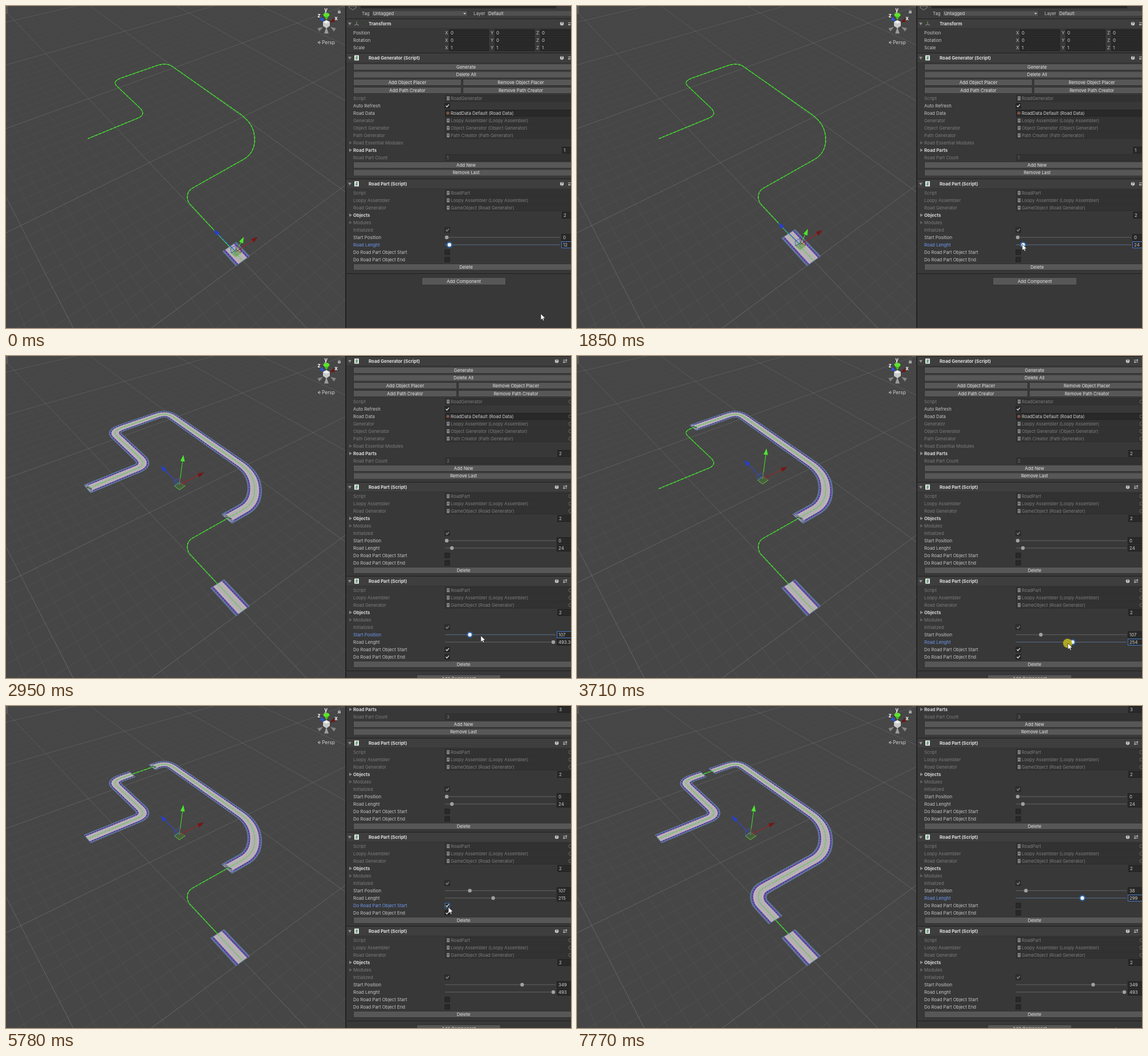
Recreate the animation shown at these times as an HTML page with a canvas. Size 991 px wide and 565 px high, loop 7.8 s.

```html
<!DOCTYPE html>
<html lang="en">
<head>
<meta charset="utf-8">
<title>Road editor</title>
<style>
html, body { margin: 0; width: 100%; height: 100%; overflow: hidden; background: #383838; }
canvas { display: block; }
</style>
</head>
<body>
<canvas id="stage" width="991" height="565"></canvas>
<script>
const ctx = document.getElementById('stage').getContext('2d');
const LOOP = 7800, MAX = 493.3;
const FONT = 'Inter, "Open Sans", sans-serif';

// ---------- timeline ----------
function tween(keys, t) {
  const i = keys.findIndex(k => k[0] > t);
  if (i < 0) return keys[keys.length - 1].slice(1);
  if (i === 0) return keys[0].slice(1);
  const a = keys[i - 1], b = keys[i], f = (t - a[0]) / (b[0] - a[0]);
  return a.slice(1).map((v, j) => v + (b[j + 1] - v) * f);
}
const last = (steps, t) => steps.filter(s => s[0] <= t).pop();

const CURSOR = [
  [0, 938, 540], [50, 938, 540], [260, 777, 419], [670, 953, 427], [920, 968, 429], [1050, 968, 429],
  [1680, 781, 418], [1860, 781, 418], [2070, 807, 281], [2130, 807, 281], [2320, 773, 489],
  [2450, 799, 488], [2850, 813, 489], [2920, 813, 489], [3150, 960, 502], [3200, 958, 502],
  [3710, 861, 504], [3950, 853, 504], [4030, 853, 504], [4270, 802, 199], [4340, 802, 199],
  [4640, 773, 489], [5140, 905, 490], [5180, 905, 490], [5390, 775, 516], [5450, 775, 516],
  [5550, 775, 528], [5640, 775, 528], [5725, 775, 514], [5775, 776, 353], [5950, 776, 353],
  [6040, 776, 365], [6120, 776, 365], [6290, 813, 324], [6750, 787, 325], [6800, 787, 325],
  [6940, 854, 337], [7350, 888, 338], [7450, 886, 338], [7750, 945, 563]
];
const PRESSED = [[260, 1700], [2070, 2130], [2320, 2900], [3160, 4000], [4280, 4340], [4650, 5180],
  [5400, 5440], [5560, 5600], [6050, 6100], [6300, 6780], [6950, 7450]];
const LENGTH_0 = [[260, 12], [670, 458], [830, 486], [920, MAX], [1050, MAX], [1450, 150], [1680, 24]];
const START_1 = [[2350, 0], [2450, 26], [2850, 107], [6320, 107], [6750, 38]];
const LENGTH_1 = [[3200, MAX], [3710, 254], [3950, 215], [6950, 215], [7350, 303], [7450, 299]];
const START_2 = [[4650, 0], [5140, 349]];
const FOCUS = [[0, '0len'], [2100, ''], [2320, '1start'], [3160, '1len'], [4320, ''], [4650, '2start'],
  [5400, '2from'], [5560, '2to'], [5770, '1from'], [6050, '1to'], [6300, '1start'], [6950, '1len']];

function partsAt(t) {
  const parts = [{ start: 0, len: tween(LENGTH_0, t)[0], from: false, to: false }];
  if (t >= 2100) parts.push({ start: tween(START_1, t)[0], len: tween(LENGTH_1, t)[0], from: t < 5830, to: t < 6080 });
  if (t >= 4320) parts.push({ start: tween(START_2, t)[0], len: MAX, from: t < 5430, to: t < 5590 });
  return parts;
}

// ---------- drawing helpers ----------
function rect(x, y, w, h, fill, edge) {
  ctx.fillStyle = fill;
  ctx.fillRect(x, y, w, h);
  if (edge) { ctx.strokeStyle = edge; ctx.lineWidth = 1; ctx.strokeRect(x + .5, y + .5, w - 1, h - 1); }
}
function text(s, x, y, color = '#c6c6c6', o = {}) {
  ctx.font = `${o.bold ? 700 : 400} ${o.size || 7.8}px ${FONT}`;
  ctx.textAlign = o.align || 'left';
  ctx.textBaseline = 'middle';
  ctx.fillStyle = color;
  ctx.fillText(s, x, y + .5);
}
function shape(pts, fill, stroke, width = 1, close = true) {
  ctx.beginPath();
  pts.forEach(p => ctx.lineTo(p[0], p[1]));
  if (close) ctx.closePath();
  if (fill) { ctx.fillStyle = fill; ctx.fill(); }
  if (stroke) { ctx.strokeStyle = stroke; ctx.lineWidth = width; ctx.stroke(); }
}
const line = (pts, color, width = 1) => shape(pts, null, color, width, false);
function disc(x, y, rx, fill, ry = rx) {
  ctx.beginPath();
  ctx.ellipse(x, y, rx, ry, 0, 0, 7);
  ctx.fillStyle = fill;
  ctx.fill();
}
function cone(x, y, dx, dy, size, fill) {
  const n = Math.hypot(dx, dy), ux = dx / n * size, uy = dy / n * size;
  shape([[x + ux, y + uy], [x - ux * .6 - uy * .55, y - uy * .6 + ux * .55],
    [x - ux * .6 + uy * .55, y - uy * .6 - ux * .55]], fill);
}

// ---------- ground plane: origin and two vanishing points ----------
const O = [415, 447], V = [-361, -370], W = [1434, -304], KA = .00267, KB = .00203;
function project(a, b) {
  const p = a * KA, q = b * KB;
  return [0, 1].map(i => (O[i] + p * V[i] + q * W[i]) / (1 + p + q));
}
function unproject(x, y) {
  const a = V[0] - x, b = W[0] - x, c = V[1] - y, d = W[1] - y, e = x - O[0], f = y - O[1];
  const det = a * d - b * c;
  return [(e * d - b * f) / det / KA, (a * f - c * e) / det / KB];
}

// Road axis, resampled once by ground distance
const STEP = .5, TRACK = (() => {
  const path = document.createElementNS('http://www.w3.org/2000/svg', 'path');
  path.setAttribute('d', 'M415 447L322 347C316 339 316 325 328 319L415 270C432 261 437 246 436 231' +
    'C435 215 428 203 413 191L293 107C284 101 277 101 266 104L203 126C190 131 188 135 196 142' +
    'L236 180C241 186 242 191 233 196L143 233');
  const total = path.getTotalLength(), raw = [], track = [];
  let dist = 0;
  for (let i = 0; i <= 800; i++) {
    const p = path.getPointAtLength(total * i / 800), g = unproject(p.x, p.y), prev = raw[i - 1];
    if (prev) dist += Math.hypot(g[0] - prev[1], g[1] - prev[2]);
    raw.push([dist, ...g]);
  }
  raw.forEach(r => r[0] *= MAX / dist);
  for (let s = 0; s <= MAX + STEP; s += STEP) track.push(tween(raw, s));
  return track;
})();
function axis(s) {
  const i = Math.min(TRACK.length - 2, Math.floor(s / STEP)), f = s / STEP - i;
  const [a, b] = TRACK[i], [c, d] = TRACK[i + 1];
  return [a + (c - a) * f, b + (d - b) * f];
}
const AXIS_PTS = TRACK.map(g => project(...g));

function side(s, off) {
  const [a, b] = axis(s), p = axis(Math.max(0, s - 1.5)), q = axis(Math.min(MAX, s + 1.5));
  const da = q[0] - p[0], db = q[1] - p[1], n = Math.hypot(da, db) || 1;
  return project(a - db / n * off, b + da / n * off);
}
function edge(from, to, off) {
  const pts = [];
  for (let s = from; s < to; s += 2.5) pts.push(side(s, off));
  pts.push(side(to, off));
  return pts;
}
const band = (from, to, w) => edge(from, to, w).concat(edge(from, to, -w).reverse());

function road(part) {
  const from = part.start, to = Math.min(MAX, part.start + part.len);
  ctx.lineJoin = 'round';
  shape(band(from, to, 5.5), '#5c7896', '#5c7896', 2);
  shape(band(from, to, 4.9), '#6d52b4');
  ctx.setLineDash([1.6, 3]);
  for (const o of [-4.3, 4.3]) line(edge(from, to, o), '#33285f', 1.5);
  ctx.setLineDash([]);
  shape(band(from, to, 3.6), '#b6b0b3');
  for (const o of [-2.9, 2.9]) line(edge(from, to, o), '#c6c1c3', .7);
  if (part.from) barrier(from, Math.min(to, from + 3));
  if (part.to) barrier(Math.max(from, to - 3), to);
}
function barrier(from, to) {
  shape(band(from, to, 4.2), 'rgba(70,76,90,.45)', '#a9bccf', 1);
  line([side(from, -2), side(to, 2)], '#3c4048', 1.4);
}

// ---------- scene ----------
function grid() {
  const fade = ctx.createLinearGradient(0, 0, 0, 565);
  fade.addColorStop(0, 'rgba(110,110,110,.06)');
  fade.addColorStop(1, 'rgba(110,110,110,.32)');
  const major = ctx.createLinearGradient(0, 0, 0, 565);
  major.addColorStop(0, 'rgba(135,135,135,.35)');
  major.addColorStop(1, 'rgba(135,135,135,.65)');
  for (let v = -200; v <= 600; v += 10) {
    const style = v % 100 ? fade : major;
    if (v >= -100) line([project(v, -200), project(v, 900)], style, .8);
    line([project(-100, v), project(900, v)], style, .8);
  }
}
function axisLine() {
  line(AXIS_PTS, 'rgba(42,205,25,.95)', 1.3);
  ctx.setLineDash([3, 4]);
  line(AXIS_PTS, '#a5d890', .9);
  ctx.setLineDash([]);
}
function moveHandle(parts) {
  let a0 = 1e9, a1 = -1e9, b0 = 1e9, b1 = -1e9;
  for (const p of parts) {
    const end = Math.min(MAX, p.start + p.len);
    for (let i = 0; i <= 60; i++) {
      const [a, b] = axis(p.start + (end - p.start) * i / 60);
      a0 = Math.min(a0, a); a1 = Math.max(a1, a);
      b0 = Math.min(b0, b); b1 = Math.max(b1, b);
    }
  }
  const [x, y] = project((a0 + a1) / 2 * 1.04, (b0 + b1) / 2);
  const k = (y - 223) / 211, mix = (p, q) => p + (q - p) * k;
  const up = [mix(6, 11), mix(-49, -23)], right = [mix(37, 33), mix(-21, -25)], fwd = [mix(-28, -34), mix(-31, -37)];
  const arrow = (d, color, tip) => {
    line([[x, y - 3], [x + d[0], y + d[1]]], color, 1.1);
    cone(x + d[0], y + d[1], d[0], d[1], 7, tip);
  };
  arrow(right, '#a32222', '#761616');
  arrow(fwd, '#2c46dc', '#2540cf');
  arrow(up, '#43d82a', '#4de62c');
  shape([[x - 9, y - 1], [x, y - 7], [x + 10, y - 1], [x, y + 6]], 'rgba(70,130,50,.4)', '#62cc3d', 1);
  shape([[x - 9, y - 9], [x - 1, y - 14], [x, y - 6], [x - 8, y - 1]], null, '#3a4ebc', .9);
  shape([[x + 2, y - 14], [x + 9, y - 9], [x + 9, y - 2], [x + 1, y - 6]], null, '#7d2a35', .8);
}
function orientation() {
  cone(551, 40, 8, -5, 6, '#858585');
  cone(574, 40, -8, -5, 6, '#858585');
  cone(562, 44, 0, -8, 7, '#9c9c9c');
  cone(555, 24, 7, 5, 6, '#2b56d8');
  cone(573, 26, -7, 4, 6, '#6d1515');
  shape([[556, 28], [562, 25], [568, 28], [568, 35], [562, 39], [556, 35]], '#c9c9c9');
  shape([[556, 28], [562, 25], [568, 28], [562, 31]], '#ececec');
  shape([[557, 16], [567, 16], [562, 25]], '#3fb81f');
  disc(562, 15.5, 5.5, '#5de22a', 3.6);
  for (const [s, x, y] of [['y', 561, 7], ['z', 549, 17], ['x', 579, 22]])
    text(s, x, y, '#f0f0f0', { bold: 1, size: 9.5, align: 'center' });
  rect(582, 9, 5, 4, '#a8a8a8');
  ctx.beginPath(); ctx.arc(584.5, 9, 1.7, Math.PI, 0); ctx.strokeStyle = '#a8a8a8'; ctx.lineWidth = 1; ctx.stroke();
  line([[551, 61.5], [547, 64], [551, 66.5]], '#c4c4c4', .9);
  line([[547, 64], [552, 64]], '#c4c4c4', .9);
  text('Persp', 554, 64, '#d0d0d0', { size: 8.4 });
}
function scene(parts) {
  ctx.save();
  ctx.beginPath(); ctx.rect(0, 0, 596, 565); ctx.clip();
  rect(0, 0, 596, 565, '#464646');
  grid();
  axisLine();
  parts.forEach(road);
  ctx.globalAlpha = .55;
  axisLine();
  ctx.globalAlpha = 1;
  moveHandle(parts);
  orientation();
  rect(0, 0, 3, 13, '#333', '#707070');
  ctx.restore();
}

// ---------- inspector ----------
const DIM = '#7d7d7d', BLUE = '#6f98ee';
let right, fieldX;

function button(s, x0, x1, y, h = 12) {
  rect(x0, y - h / 2, x1 - x0, h, '#575757', '#323232');
  text(s, (x0 + x1) / 2, y, '#e6e6e6', { align: 'center' });
}
const wideButton = (s, y) => button(s, 609, right, y);
function fold(x, y, open, color = '#8c8c8c') {
  shape(open ? [[x - 3, y - 2], [x + 3, y - 2], [x, y + 3]] : [[x - 2, y - 3], [x + 3, y], [x - 2, y + 3]], color);
}
function field(x, y, s, focus) {
  rect(x, y - 6, 1010 - x, 12, '#292929', focus ? '#4678c8' : '#202020');
  text(s, x + 3, y, '#d0d0d0');
}
function header(s, y, transform) {
  rect(597, y - 9, 394, 17, '#3e3e3e');
  rect(597, y - 9, 394, 1, '#202020');
  rect(597, y + 8, 394, 1, '#333');
  fold(603, y, true);
  if (transform) {
    line([[615, y + 1], [615, y - 4]], '#63b04c');
    line([[611, y + 3], [615, y + 1], [619, y + 3]], '#8aa0a8');
  } else {
    rect(611, y - 4.5, 8, 9, '#e6ebe8');
    text('#', 615, y, '#26743c', { bold: 1, size: 7, align: 'center' });
  }
  text(s, 636, y, '#dedede', { bold: 1 });
  disc(right - 30, y, 3.3, '#c8c8c8');
  text('?', right - 30, y, '#3e3e3e', { bold: 1, size: 6, align: 'center' });
  for (const d of [-1.7, 1.7]) {
    line([[right - 19, y + d], [right - 12, y + d]], '#c4c4c4');
    rect(right - 16 - d * 1.3, y + d - 1.5, 1.5, 3, '#c4c4c4');
  }
}
function objectRow(label, value, y, live) {
  text(label, 609, y, live ? '#c6c6c6' : DIM);
  rect(770, y - 6, 240, 12, live ? '#292929' : '#323232', live ? '#202020' : '#2d2d2d');
  if (live) disc(775, y, 2.8, '#7c5346');
  else {
    rect(773, y - 3.5, 5, 7, '#858585');
    rect(774, y - 1, 3, 1, '#454545');
  }
  text(value, 780, y, live ? '#d0d0d0' : DIM);
  ctx.beginPath(); ctx.arc(right - 6, y, 3, 0, 7);
  ctx.strokeStyle = '#777'; ctx.lineWidth = .8; ctx.stroke();
}
function listRow(label, count, y) {
  fold(604, y, false);
  text(label, 609, y, '#d6d6d6', { bold: 1 });
  field(fieldX + 1, y, count);
}
function modulesRow(label, y) {
  fold(604, y, false, '#5e5e5e');
  text(label, 609, y, DIM);
}
function checkRow(label, on, y, { dim, focus } = {}) {
  text(label, 609, y, focus ? BLUE : dim ? DIM : '#c6c6c6');
  rect(769.5, y - 4.5, 9, 9, dim ? '#333' : '#292929', focus ? '#4678c8' : '#202020');
  if (on) line([[771.5, y], [773.4, y + 2], [777, y - 2.3]], dim ? '#898989' : '#e2e2e2', 1.3);
}
function sliderRow(label, value, y, focus, shown) {
  text(label, 609, y, focus ? BLUE : '#c6c6c6');
  rect(770, y - .5, fieldX - 2 - 770, 1, focus ? '#58708c' : '#646464');
  const x = 773 + value / MAX * (fieldX - 6 - 773);
  if (focus) disc(x, y, 5.4, '#2e62a4');
  disc(x, y, 3.2, focus ? '#f2f2f2' : '#a0a0a0');
  field(fieldX, y, shown, focus);
}
function roadPart(p, i, y, focus) {
  const on = key => focus === i + key;
  header('Road Part (Script)', y);
  objectRow('Script', 'RoadPart', y + 16);
  objectRow('Loopy Assembler', 'Loopy Assembler (Loopy Assembler)', y + 29);
  objectRow('Road Generator', 'GameObject (Road Generator)', y + 42);
  listRow('Objects', 2, y + 55);
  modulesRow('Modules', y + 68);
  checkRow('Initialized', true, y + 81, { dim: true });
  sliderRow('Start Position', p.start, y + 94, on('start'), Math.round(p.start));
  sliderRow('Road Lenght', p.len, y + 107, on('len'), p.len === MAX && i < 2 ? MAX : Math.round(p.len));
  checkRow('Do Road Part Object Start', p.from, y + 120, { focus: on('from') });
  checkRow('Do Road Part Object End', p.to, y + 133, { focus: on('to') });
  wideButton('Delete', y + 146);
}
function dropdown(s, x, w, y) {
  rect(x, y - 5.5, w, 11, '#505050', '#303030');
  text(s, x + 3, y, '#dcdcdc');
  shape([[x + w - 8, y - 1], [x + w - 3, y - 1], [x + w - 5.5, y + 2]], '#c4c4c4');
}
function topRows() {
  rect(597, 0, 394, 22, '#3c3c3c');
  shape([[602, 0], [602, 3], [608, 7], [614, 3], [614, 0]], null, '#888');
  rect(622, 0, 343, 4, '#2b2b2b', '#222');
  text('Tag', 624, 13);
  dropdown('Untagged', 641, 169, 13);
  text('Layer', 820, 13);
  dropdown('Default', 843, 170, 13);
  header('Transform', 31, true);
  ['Position', 'Rotation', 'Scale'].forEach((name, i) => {
    const y = 47 + i * 13;
    text(name, 609, y);
    ['X', 'Y', 'Z'].forEach((axisName, j) => {
      const x = 777 + j * 80;
      text(axisName, x - 7, y);
      rect(x, y - 6, 70, 12, '#292929', '#202020');
      text(i === 2 ? 1 : 0, x + 3, y, '#d0d0d0');
    });
  });
}
function generator(count) {
  const mid = fieldX - 174;
  header('Road Generator (Script)', 91);
  wideButton('Generate', 107);
  wideButton('Delete All', 120.5);
  ['Object Placer', 'Path Creator'].forEach((s, i) => {
    const y = 134 + i * 14;
    button('Add ' + s, 609, mid - 1, y);
    button('Remove ' + s, mid + 1, right, y);
  });
  objectRow('Script', 'RoadGenerator', 162);
  checkRow('Auto Refresh', true, 175);
  objectRow('Road Data', 'RoadData Default (Road Data)', 188, true);
  objectRow('Generator', 'Loopy Assembler (Loopy Assembler)', 201);
  objectRow('Object Generator', 'Object Generator (Object Generator)', 214);
  objectRow('Path Generator', 'Path Creator (Path Generator)', 227);
  modulesRow('Road Essential Modules', 240);
  listRow('Road Parts', count, 253);
  text('Road Part Count', 609, 266, DIM);
  rect(770, 260, 240, 12, '#323232', '#2d2d2d');
  text(count, 773, 266, DIM);
  wideButton('Add New', 279);
  wideButton('Remove Last', 292.5);
}
function inspector(parts, focus) {
  const n = parts.length;
  right = n > 1 ? 996 : 1005;
  fieldX = n > 1 ? 966 : 974;
  ctx.save();
  ctx.beginPath(); ctx.rect(596, 0, 395, 565); ctx.clip();
  rect(596, 0, 395, 565, '#383838');
  ctx.translate(0, [0, -82, -247][n - 1]);
  topRows();
  generator(n);
  parts.forEach((p, i) => roadPart(p, i, 312 + i * 165, focus));
  const end = 312 + (n - 1) * 165;
  rect(597, end + 157, 394, 1, '#202020');
  button('Add Component', right - 276, right - 128, end + 171, 14);
  ctx.restore();
  rect(595, 0, 2, 565, '#222');
}

// ---------- pointer ----------
function pointer(t) {
  const [x, y] = tween(CURSOR, t);
  if (PRESSED.some(([a, b]) => t >= a && t < b)) disc(x - .5, y, 8, 'rgba(190,180,28,.88)');
  shape([[0, 0], [0, 11], [2.6, 8.7], [4.3, 12.3], [6.1, 11.5], [4.5, 8], [8, 7.8]]
    .map(p => [x + p[0], y + p[1]]), '#fff', '#222', .7);
}

const begin = performance.now();
function frame(now) {
  const t = Math.max(0, now - begin) % LOOP, parts = partsAt(t);
  scene(parts);
  inspector(parts, last(FOCUS, t)[1]);
  pointer(t);
  requestAnimationFrame(frame);
}
requestAnimationFrame(frame);
</script>
</body>
</html>
```
